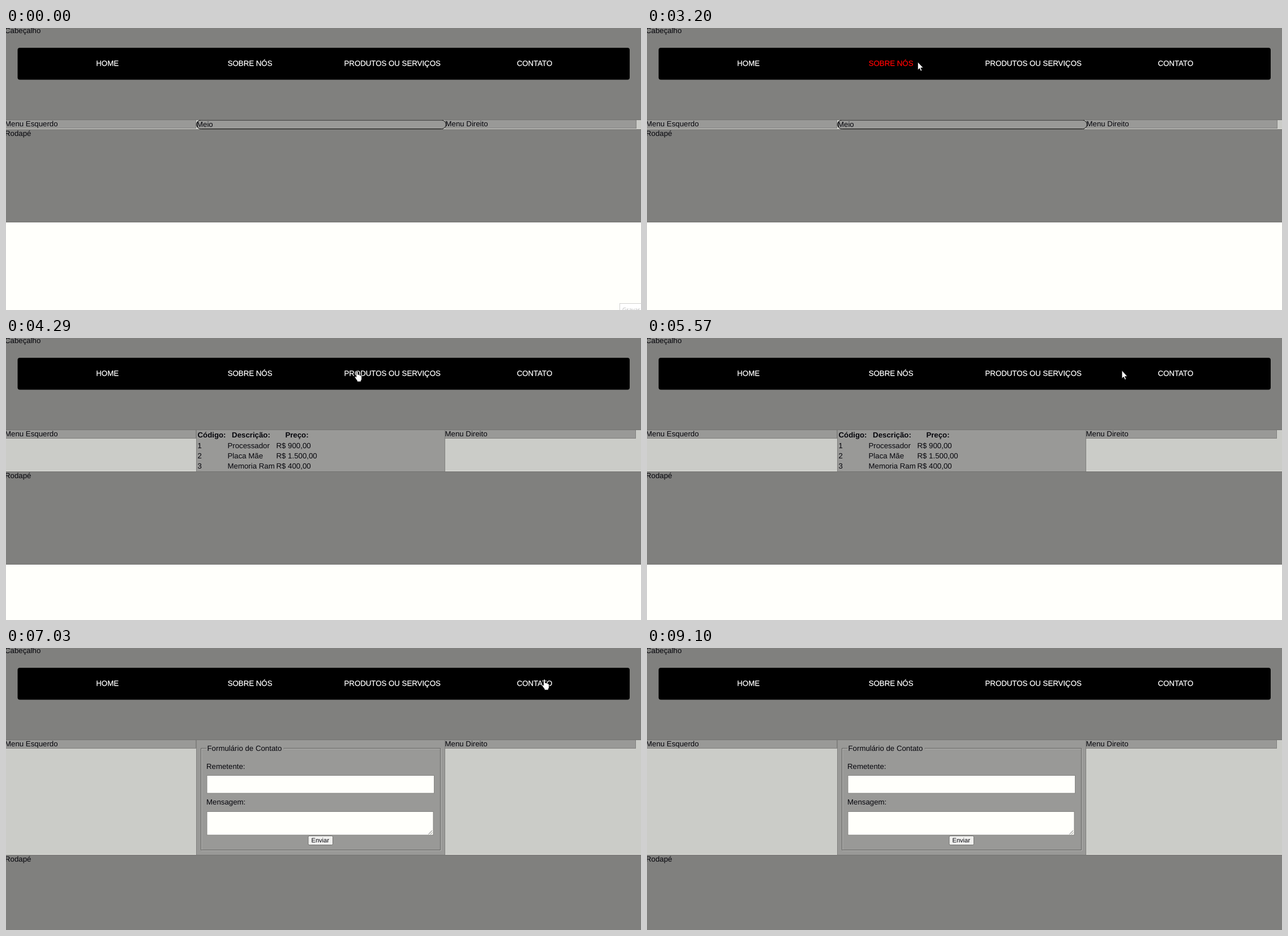
Write an HTML page that moves like this. It is 1122x499 px and loops after 9.96 s.

```html
<!DOCTYPE html>
<html lang="pt">
<head>
<meta charset="utf-8">
<title>Menu</title>
<style>
  html, body { margin: 0; width: 100%; height: 100%; overflow: hidden; background: #fffffb; }
  svg { display: block; width: 1122px; height: 499px; }
  text { font: 13.25px "Liberation Sans", Arial, sans-serif; text-rendering: geometricPrecision;
    color: #06060c; fill: currentColor; white-space: pre; }
  .head { font-weight: bold; text-anchor: middle; }
  #nav text { color: #fff; stroke: currentColor; stroke-width: .25; }
  #nav text.hot { color: #f00; }
  .panel { fill: #999997; stroke: #80807e; }
  .bar { fill: #80807e; }
  .edge { stroke: #737371; }
  .field { fill: #fffffb; stroke: #858583; }
</style>
</head>
<body>
<svg id="stage" viewBox="0 0 1122 499"></svg>
<script>
const LOOP = 9960;
const TICK = 1000 / 15;
const stage = document.getElementById('stage');
const $ = id => document.getElementById(id);

const text = (x, y, s, attrs = '') => `<text x="${x}" y="${y}" ${attrs}>${s}</text>`;
const rect = (cls, x, y, w, h, attrs = '') =>
  `<rect class="${cls}" x="${x}" y="${y}" width="${w}" height="${h}" ${attrs}/>`;
const line = (y, attrs = 'class="edge"') => `<path d="M0 ${y}H1122" ${attrs}/>`;

// Three columns above a footer that starts at `bottom`.
function page(id, bottom, right, middle) {
  return `<g class="page" id="${id}">
    <rect y="162" width="1122" height="${bottom - 162}" fill="#cbccc8"/>
    ${line(bottom - 1.5, 'stroke="#deded9"')}
    ${rect('panel', -1.5, 162.5, 337, 15)}
    ${rect('panel', right, 162.5, 337, 15)}
    ${middle}
    ${rect('bar', 0, bottom, 1122, 164)}
    ${line(162.5)}${line(bottom - .5)}${line(bottom + 163.5)}
    ${text(-2, 174, 'Menu Esquerdo')}
    ${text(right, 174, 'Menu Direito')}
    ${text(-2, bottom + 10.5, 'Rodapé')}
  </g>`;
}

const column = bottom => rect('panel', 336.5, 162.5, 439, bottom - 163);

const columns = [
  { x: 338.5, mid: 363.5, cells: ['Código:', '1', '2', '3'] },
  { x: 391.5, mid: 433, cells: ['Descrição:', 'Processador', 'Placa Mãe', 'Memoria Ram'] },
  { x: 477.5, mid: 514, cells: ['Preço:', 'R$ 900,00', 'R$ 1.500,00', 'R$ 400,00'] }
];
const table = columns.map(({ x, mid, cells }) => cells.map((s, row) => {
  const y = 176.3 + row * 18.2;
  return row ? text(x, y, s) : text(mid, y, s, 'class="head"');
}).join('')).join('');

const groove = 'M354.5 177.5H344.5V357.5H767.5V177.5H490.5';
const form = `
  <path d="${groove}" transform="translate(1 1)" fill="none" stroke="#b4b4b2"/>
  <path d="${groove}" fill="none" stroke="#626260"/>
  ${text(355.5, 182, 'Formulário de Contato')}
  ${text(354, 213.5, 'Remetente:')}
  ${rect('field', 355, 225.5, 401.5, 31.5)}
  ${text(354, 277, 'Mensagem:')}
  ${rect('field', 355, 289.5, 400, 41.5)}
  <path d="M746.5 329.5l6.5-6.5M750 329.5l3-3" stroke="#666"/>
  ${rect('', 534, 332.5, 43.5, 16, 'rx="2" fill="#efefed" stroke="#70706e"')}
  ${text(539.5, 344, 'Enviar', 'style="font-size:11.1px"')}`;

stage.innerHTML = `
  ${rect('bar', 0, 0, 1122, 162)}
  ${text(-2, 9, 'Cabeçalho')}
  <rect x="20.5" y="35" width="1081.5" height="56.5" rx="4"/>
  <g id="nav">
    ${text(159.3, 67, 'HOME')}${text(391.7, 67, 'SOBRE NÓS')}
    ${text(597.5, 67, 'PRODUTOS OU SERVIÇOS')}${text(902.7, 67, 'CONTATO')}
  </g>
  ${page('home', 180, 776.5,
    rect('', 336.5, 163, 441, 15.6, 'rx="8" fill="#999997" stroke="#000"') + text(337, 175, 'Meio'))}
  ${page('products', 237, 775.5, column(237) + table)}
  ${page('contact', 367, 775.5, column(367) + form)}
  <g id="tip">
    <rect x="1084.5" y="487.5" width="40" height="14" fill="#fff" stroke="#d2d2d0"/>
    ${text(1089, 502, 'Gravar', 'style="font:10px Open Sans,sans-serif;color:#b8b8b8"')}
  </g>
  <g id="pointer" fill="#fff" stroke="#000" stroke-width=".8" stroke-linejoin="round">
    <path id="arrow" d="M.4 0V14.4L3.6 11.5 5.7 16.3 7.9 15.3 5.8 10.6H10.2Z"/>
    <path id="hand" d="M-1.2 2Q-1.2.4.3.4T1.8 2V6.8Q4.8 6.3 5.4 7.8 8.6 7.6 8.6 10.4V14Q8.6 16 7.2 17.5V19.3H.4V17.5Q-2 14.5-3.8 11.6-4 9.4-2.3 9.9L-1.2 11.3Z"/>
  </g>`;

const loads = [
  { at: 0, id: 'home' }, { at: 2450, id: 'home' },
  { at: 4290, id: 'products' }, { at: 7030, id: 'contact' }
];

// The pointer goes straight to each place, one step per tick.
const entry = { x: 991, y: 421 };
const moves = [
  { from: 330, to: 1280, x: 445, y: 68 },
  { from: 1340, to: 1620, x: 211, y: 65 },
  { from: 1740, to: 1840, x: 170, y: 54 },
  { from: 2780, to: 3200, x: 478, y: 60 },
  { from: 3270, to: 3690, x: 620, y: 58 },
  { from: 4950, to: 5900, x: 948, y: 57 },
  { from: 5960, to: 6100, x: 951, y: 55 },
  { from: 7510, to: 8470, x: 1016, y: 364 },
  { from: 8540, to: 9100, x: 1076, y: 510 }
];

function pointerAt(t) {
  const i = moves.findLastIndex(m => m.from <= t);
  if (i < 0) return null;
  const end = moves[i], begin = moves[i - 1] || entry;
  const count = Math.round((end.to - end.from) / TICK) + 1;
  const step = Math.floor((t - end.from) / TICK) + 1;
  const u = Math.min(1, step / count);
  return {
    x: begin.x + (end.x - begin.x) * u,
    y: begin.y + (end.y - begin.y) * u,
    since: end.from
  };
}

const links = [...$('nav').children].map(el => ({ el, box: el.getBBox() }));
const pages = [...document.querySelectorAll('.page')];
const over = (p, { x, width }) =>
  p !== null && p.x >= x && p.x <= x + width && Math.abs(p.y - 62) < 11;
const show = (el, on) => { el.style.visibility = on ? 'visible' : 'hidden'; };

function draw(t) {
  const load = loads.findLast(l => l.at <= t);
  pages.forEach(el => show(el, el.id === load.id));
  show($('tip'), t < 70);

  const now = pointerAt(t);
  const onLink = links.some(({ box }) => over(now, box));
  show($('hand'), now && onLink);
  show($('arrow'), now && !onLink);
  if (now) $('pointer').setAttribute('transform', `translate(${now.x} ${now.y})`);

  // Colours trail the pointer by a tick, and a new page waits for it to move.
  const before = pointerAt(t - TICK);
  const awake = now && now.since >= load.at;
  links.forEach(({ el, box }) => el.classList.toggle('hot', Boolean(awake && over(before, box))));
}

function loop() {
  draw(performance.now() % LOOP);
  requestAnimationFrame(loop);
}
loop();
</script>
</body>
</html>
```
